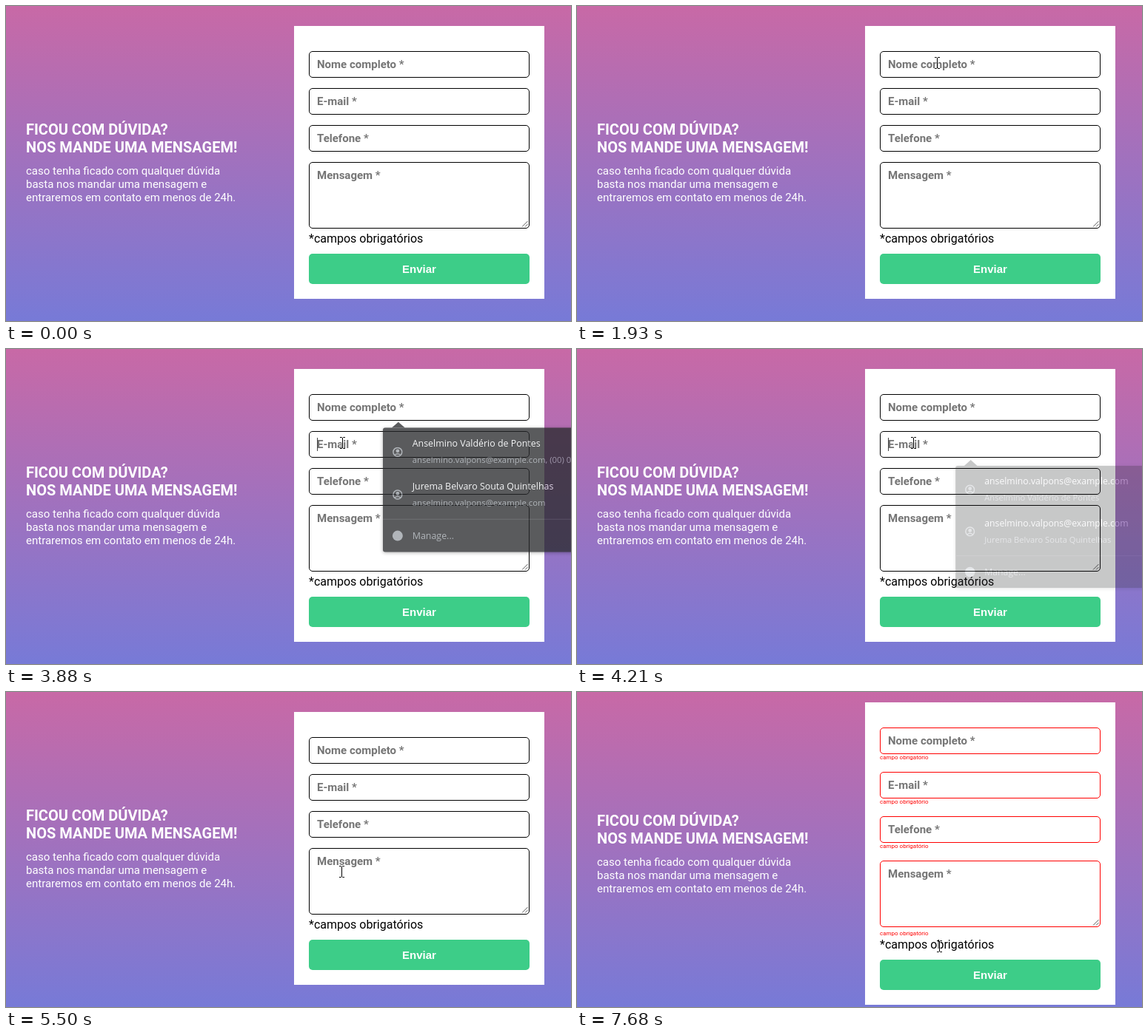
Animation, 763 px wide and 426 px high, one loop 8000 ms. Source, as an HTML page:

```html
<!DOCTYPE html>
<html lang="pt-BR">
<head>
<meta charset="utf-8">
<title>Formulário de contato</title>
<style>
  * { box-sizing: border-box; }
  html, body { margin: 0; width: 100%; height: 100%; overflow: hidden; }
  #stage {
    position: relative; width: 763px; height: 426px; overflow: hidden;
    background: linear-gradient(#c869a6, #777ad7);
    font-family: Roboto, sans-serif; white-space: nowrap; cursor: default;
  }
  #stage div, #stage svg { position: absolute; }
  #stage .intro { left: 27px; top: 155px; color: #fff; }
  .intro h1 { margin: 0 0 11px; font: 700 20px/24px Roboto, sans-serif; }
  .intro p { margin: 0; font-size: 15px; line-height: 18px; }
  .card { left: 389px; top: 27px; width: 338px; height: 369px; background: #fff; }
  .field {
    left: 409px; top: var(--y); width: 298px; height: 36px; padding-left: 10px;
    border: 1px solid #000; border-radius: 5px; background: #fff;
    color: #757575; font-weight: 700; font-size: 15px; line-height: 34px;
  }
  .field.area { height: 90px; }
  .field svg { right: 0; bottom: 0; }
  .error { left: 409px; top: var(--e); color: #f00; font-size: 8px; line-height: 10px; display: none; }
  .note { left: 409px; top: 305px; font-size: 16px; line-height: 19px; color: #000; }
  .send {
    left: 409px; top: 335px; width: 298px; height: 41px; border-radius: 5px;
    background: #3dcd88; color: #fff; text-align: center;
    font: 700 15px/41px "Liberation Sans", Arial, sans-serif;
  }
  .invalid .intro { margin-top: 7px; }
  .invalid .card { top: 14px; height: 409px; }
  .invalid .field { top: var(--iy); border-color: #f00; }
  .invalid .error { display: block; }
  .invalid .note, .invalid .send { margin-top: 27px; }
  #caret { left: 420px; width: 1px; height: 18px; background: #444; }
  .popup {
    left: 508px; width: 284px; height: 169px; border-radius: 3px; background: #292a2d;
    box-shadow: 0 1px 5px rgba(0,0,0,.4); color: #9aa0a6;
    font-family: "Open Sans", "Noto Sans", sans-serif; opacity: 0;
  }
  .popup::before {
    content: ""; position: absolute; left: 12px; top: -8px;
    border: solid transparent; border-width: 0 9px 8px; border-bottom-color: #292a2d;
  }
  .popup div { left: 40px; line-height: 20px; font-size: 11.4px; }
  .popup .main { color: #f1f3f4; font-size: 12.5px; }
  .popup .manage { top: 137px; font-size: 12.5px; }
  .popup .rule { left: 0; top: 124px; width: 100%; height: 1px; background: #45474a; }
  .popup .dot { left: 13px; top: 140px; width: 14px; height: 14px; border-radius: 50%; background: #9aa0a6; }
  .popup svg { left: 13px; }
  #click { width: 24px; height: 24px; margin: -13px 0 0 -14px; border-radius: 50%; background: rgba(248,240,20,.6); }
  #pointer { left: 0; top: 0; width: 1px; height: 1px; overflow: visible; }
</style>
</head>
<body>
<div id="stage">
  <div class="intro">
    <h1>FICOU COM DÚVIDA?<br>NOS MANDE UMA MENSAGEM!</h1>
    <p>caso tenha ficado com qualquer dúvida<br>basta nos mandar uma mensagem e<br>entraremos em contato em menos de 24h.</p>
  </div>
  <div class="card"></div>
  <div class="field" style="--y:61px;--iy:48px">Nome completo *</div>
  <div class="field" style="--y:111px;--iy:108px">E-mail *</div>
  <div class="field" style="--y:161px;--iy:168px">Telefone *</div>
  <div class="field area" style="--y:211px;--iy:228px">Mensagem *
    <svg width="11" height="11"><path d="M2 9.5 9.5 2M6 9.5 9.5 6" stroke="#555" fill="none"/></svg>
  </div>
  <div class="error" style="--e:84px">campo obrigatório</div>
  <div class="error" style="--e:144px">campo obrigatório</div>
  <div class="error" style="--e:204px">campo obrigatório</div>
  <div class="error" style="--e:322px">campo obrigatório</div>
  <div class="note">*campos obrigatórios</div>
  <div class="send">Enviar</div>
  <div id="caret"></div>
  <div id="click"></div>
  <svg id="pointer">
    <path id="arrow" d="M.5.5V16.5L4.2 13 6.8 18.7 9.4 17.6 6.9 12H12Z" fill="#fff" stroke="#000"/>
    <g id="beam" fill="none">
      <path d="M0-6V6" stroke="#fff" stroke-width="3" opacity=".6"/>
      <path d="M-3.5-7.5H-1L0-6.5 1-7.5H3.5M0-7V7M-3.5 7.5H-1L0 6.5 1 7.5H3.5" stroke="#000"/>
    </g>
    <path id="hand" d="M-1.5 1.5Q0-.5 1.5 1.5V8Q3 6.5 4.5 8.5 6 7 7.5 9.3 9.5 8.5 9.5 11V15Q9.5 18 7.5 19.5V22H-1.5V20L-6 13.5Q-6 10.5-3.5 12L-1.5 14Z" fill="#fff" stroke="#000"/>
  </svg>
</div>
<script>
const LOOP = 8000;
const $ = id => document.getElementById(id);
const stage = $('stage');
const clamp = x => Math.max(0, Math.min(1, x));
const within = (t, [from, to]) => t >= from && t < to;

const names = ['Anselmino Valdério de Pontes', 'Jurema Belvaro Souta Quintelhas'];
const email = 'anselmino.valpons@example.com';
const person = top => `<svg style="top:${top}px" width="14" height="14" fill="none" stroke="#9aa0a6" stroke-width="1.5">
  <circle cx="7" cy="7" r="6"/><circle cx="7" cy="5.5" r="1.7" fill="#9aa0a6"/><path d="M3 11.2Q7 7.8 11 11.2"/></svg>`;

function addPopup(top, rows, times) {
  const el = document.createElement('div');
  el.className = 'popup';
  el.style.top = top + 'px';
  el.innerHTML = rows.map(([main, sub], i) => {
    const y = 12 + 58 * i;
    return `${person(y + 14)}<div class="main" style="top:${y}px">${main}</div><div style="top:${y + 22}px">${sub}</div>`;
  }).join('') + '<div class="rule"></div><div class="dot"></div><div class="manage">Manage...</div>';
  stage.insertBefore(el, $('caret'));
  return { el, times };
}

// times: start and end of fading in, then of fading out
const popups = [
  addPopup(106, [[names[0], email + ', (00) 0'], [names[1], email]], [2140, 2380, 3860, 3950]),
  addPopup(156, names.map(name => [email, name]), [4150, 4390, 4820, 5060])
];

// [time, x, y] of the pointer's hot spot
const path = [
  [600, 616, -20], [700, 600, -9], [960, 535, -7], [1130, 450, 40], [1380, 470, 122],
  [1450, 470, 123], [1700, 508, 102], [1930, 486, 77], [3040, 486, 77], [3200, 454, 127],
  [4520, 454, 127], [4780, 454, 169], [5260, 454, 169], [5500, 453, 243],
  [6580, 453, 243], [7150, 489, 344], [8000, 489, 344]
];
const clicks = [[2140, 2340], [3680, 3860], [4830, 5060], [5860, 6060], [7410, 7610]];
// [on, off, top]
const carets = [
  [2250, 2790, 70], [3350, 3800, 70], [3860, 4400, 120],
  [4880, 5410, 170], [5990, 6520, 220], [7050, 7410, 220]
];

function pointerAt(t) {
  const i = path.findIndex(p => p[0] > t);
  if (i < 1) return [616, -30];
  const [t0, x0, y0] = path[i - 1], [t1, x1, y1] = path[i];
  const k = (t - t0) / (t1 - t0), s = k * k * (3 - 2 * k);
  return [Math.round(x0 + (x1 - x0) * s), Math.round(y0 + (y1 - y0) * s)];
}

function pointerKind(y, invalid) {
  if (invalid) return 'beam';
  const overText = [[61, 97], [111, 147], [161, 197], [211, 301], [305, 324]].some(r => within(y, r));
  return overText ? 'beam' : within(y, [335, 376]) ? 'hand' : 'arrow';
}

function draw(t) {
  const invalid = t >= 7610;
  stage.classList.toggle('invalid', invalid);

  for (const { el, times: [a, b, c, d] } of popups) {
    const o = clamp((t - a) / (b - a)) * clamp((d - t) / (d - c));
    el.style.opacity = o;
    el.style.transform = o < 1 ? `scale(${0.97 + 0.03 * o})` : 'none';
  }

  const caret = carets.find(c => within(t, c));
  $('caret').style.display = caret ? '' : 'none';
  if (caret) $('caret').style.top = caret[2] + 'px';

  const [x, y] = pointerAt(t), kind = pointerKind(y, invalid);
  for (const id of ['arrow', 'beam', 'hand']) $(id).style.display = id === kind ? '' : 'none';
  const shift = kind === 'beam' ? 0.5 : 0;
  $('pointer').style.transform = `translate(${x + shift}px,${y}px)`;
  $('click').style.display = clicks.some(c => within(t, c)) ? '' : 'none';
  $('click').style.left = x + 'px';
  $('click').style.top = y + 'px';
}

const start = performance.now();
(function tick() {
  draw((performance.now() - start) % LOOP);
  requestAnimationFrame(tick);
})();
</script>
</body>
</html>
```
